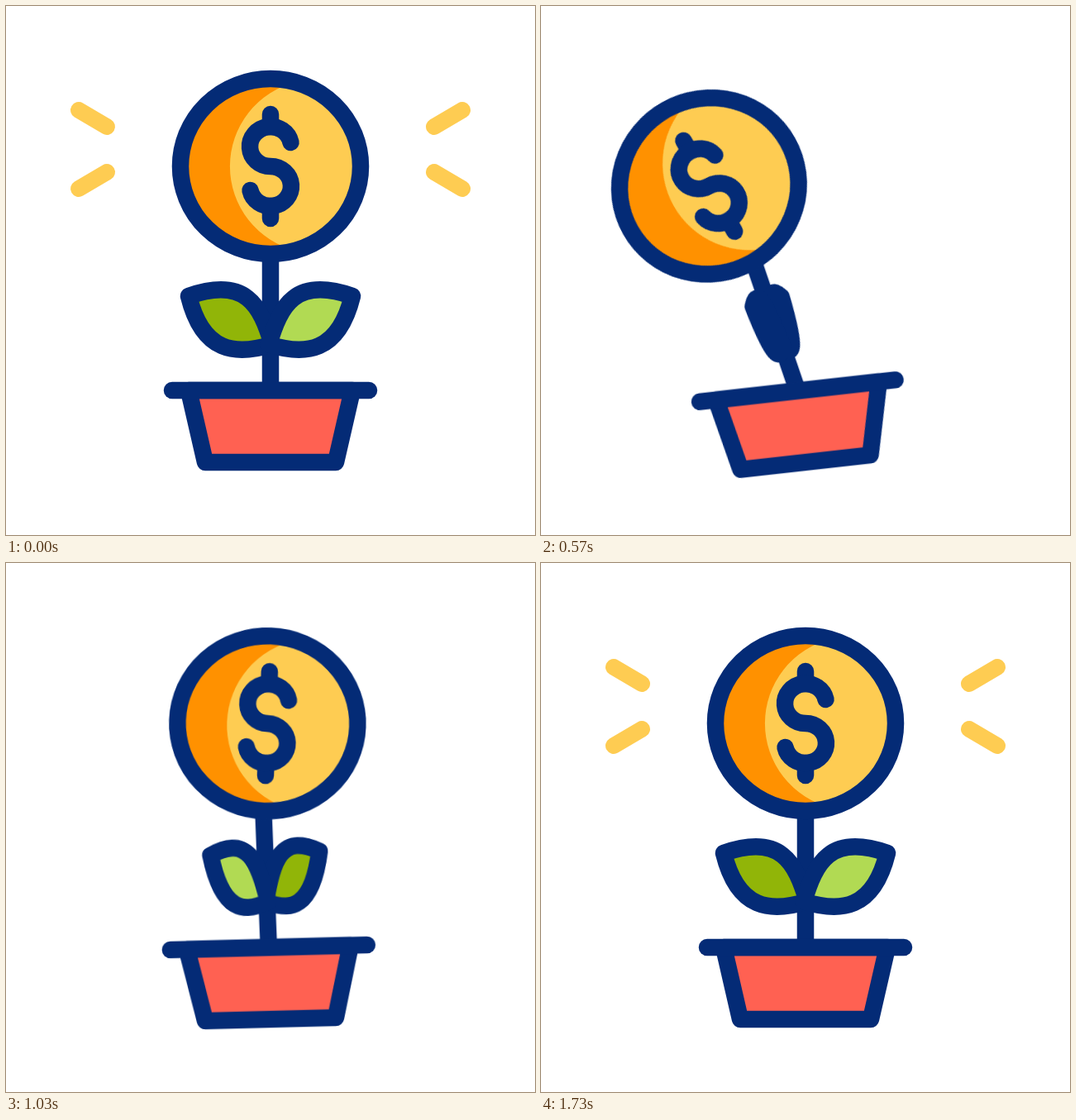
An HTML page for the animation above (2000 ms loop, 640x640 px).

```html
<!DOCTYPE html>
<html lang="en">
<head>
<meta charset="utf-8">
<title>Money plant</title>
<style>
  html, body { margin: 0; width: 100%; height: 100%; overflow: hidden; background: #fff; }
  svg { display: block; width: 100%; height: 100%; }

  :root {
    --navy: #042b76;
    --yellow: #fecc52;
    --sway: cubic-bezier(.333, 0, .667, 1);
    --leaf-left: path("M322 409.5C308 362 290 327 221 351C238 420 278 423 322 409.5Z");
    --leaf-right: path("M318 409.5C332 362 350 327 419 351C402 420 362 423 318 409.5Z");
  }

  .ink { stroke: var(--navy); stroke-width: 20.5; stroke-linecap: round; stroke-linejoin: round; fill: none; }
  .rays { stroke: var(--yellow); stroke-width: 20; stroke-linecap: round; stroke-dasharray: 1 2; }

  .pot, .stem, .coin, .leaf, .rays path { animation: 2s var(--sway) infinite; }
  .pot { transform-origin: 320px 552px; animation-name: pot; }
  .stem { transform-origin: 320px 465px; animation-name: stem; }
  .coin { transform-origin: 320px 311px; animation-name: coin; }
  .leaf.dark { fill: #91b508; d: var(--leaf-left); animation-name: turn-dark; }
  .leaf.light { fill: #b1da53; d: var(--leaf-right); animation-name: turn-light; }
  .rays path { animation-name: shine; }

  /* Each part swings inside its parent, a little later than it. */
  @keyframes pot {
    0%, 72.5%, 100% { transform: rotate(0deg); }
    22% { transform: rotate(-13.3deg); }
    40% { transform: rotate(9.7deg); }
    56.5% { transform: rotate(-4.5deg); }
  }
  @keyframes stem {
    0%, 76.5%, 100% { transform: rotate(0deg); }
    26% { transform: rotate(-13.6deg); }
    42.75% { transform: rotate(5.2deg); }
    60.75% { transform: rotate(-7.2deg); }
  }
  @keyframes coin {
    0%, 80%, 100% { transform: rotate(0deg); }
    29.5% { transform: rotate(-10.6deg); }
    46.5% { transform: rotate(7.3deg); }
    63% { transform: rotate(-5.4deg); }
  }
  /* The leaves swap sides and come back. */
  @keyframes turn-dark {
    0%, 9.75%, 75.25%, 100% { d: var(--leaf-left); }
    43.25% { d: var(--leaf-right); }
  }
  @keyframes turn-light {
    0%, 9.75%, 75.25%, 100% { d: var(--leaf-right); }
    43.25% { d: var(--leaf-left); }
  }
  @keyframes shine {
    0%, 86.5%, 100% { stroke-dashoffset: 0; }
    10%, 70% { stroke-dashoffset: 1.01; }
  }
</style>
</head>
<body>
<svg viewBox="0 0 640 640">
  <g class="rays">
    <path pathLength="1" d="M122 146L88 126"/>
    <path pathLength="1" d="M122 201L88 221"/>
    <path pathLength="1" d="M518 146L552 126"/>
    <path pathLength="1" d="M518 201L552 221"/>
  </g>
  <g class="pot ink">
    <g class="stem">
      <path d="M320 304V465" stroke-linecap="butt"/>
      <path class="leaf dark"/>
      <path class="leaf light"/>
      <g class="coin">
        <ellipse cx="320" cy="194" rx="109" ry="106" fill="#fecc52" stroke="none"/>
        <path d="M351 92A105 105 0 0 0 351 296A109 106 0 1 1 351 92Z" fill="#ff9100" stroke="none"/>
        <ellipse cx="320" cy="194" rx="109" ry="106"/>
        <path d="M320 131V146M320 242V257"/>
        <path d="M344.5 165A25 24 0 1 0 320 194A25 24 0 1 1 295.5 223"/>
      </g>
    </g>
    <path d="M221 465L241 552H399L419 465Z" fill="#ff6152"/>
    <path d="M201 465H439"/>
  </g>
</svg>
</body>
</html>
```
